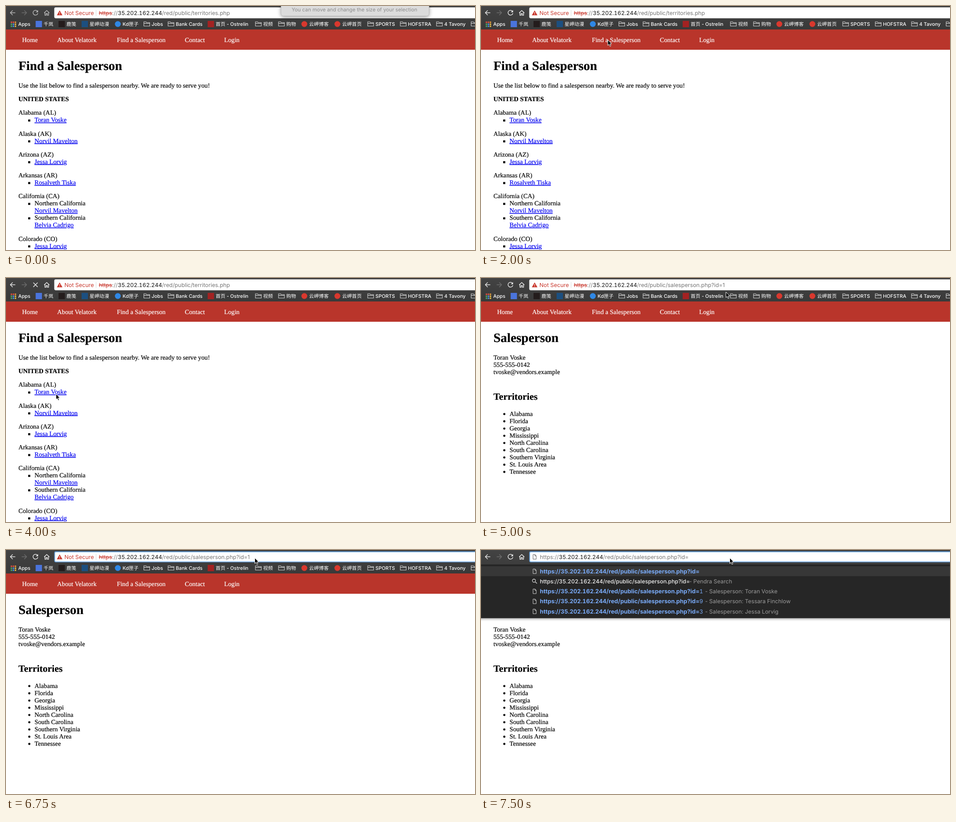
An HTML page that plays this animation: 1036 by 541 pixels, repeating every 8000 ms.

```html
<!DOCTYPE html>
<html lang="en">
<head>
<meta charset="utf-8">
<title>Find a Salesperson</title>
<style>
html, body { margin: 0; width: 100%; height: 100%; overflow: hidden; background: #fff; }
svg { display: block; width: 1036px; height: 541px; }
text { white-space: pre; text-rendering: geometricPrecision; }
.page { font: 14.22px "Liberation Serif", "Times New Roman", serif; }
.page text { stroke: #000; stroke-width: .2; }
.page .nav { fill: #fff; stroke: #fff; }
.page .link { fill: #0000ee; stroke: #0000ee; text-decoration: underline; }
.ui { font: 12.3px Inter, Roboto, sans-serif; }
.marks { font: 500 10.8px Inter, "Noto Sans CJK SC", "Noto Sans CJK", sans-serif; fill: #fff; }
.b { font-weight: 700; }
.hit { font-weight: 700; font-size: 12.8px; fill: #79aaf7; }
.query { font-weight: 500; fill: #f2f2f2; }
.num { font-feature-settings: "tnum"; }
.line { fill: none; stroke-width: 1.5; }
</style>
</head>
<body>
<script>
const W = 1036, H = 541, LOOP = 8000, STEP = 250;
const LINE = 16, GAP = 14.22, LEFT = 27.5, INDENT = 63;
const IP = '35.202.162.244';

const text = (x, y, s, attrs = '') => `<text x="${x}" y="${y}" ${attrs}>${s}</text>`;
const rect = (x, y, w, h, fill, attrs = '') =>
  `<rect x="${x}" y="${y}" width="${w}" height="${h}" fill="${fill}" ${attrs}/>`;
const circle = (x, y, r, fill) => `<circle cx="${x}" cy="${y}" r="${r}" fill="${fill}"/>`;
const path = (d, attrs = '') => `<path d="${d}" ${attrs}/>`;
const group = (id, body, attrs = '') => `<g id="${id}" ${attrs}>${body}</g>`;

// Web pages
const heading = s => text(LEFT, 141.7, s, 'class="b" font-size="28.44"');

function listPage() {
  let y = 241.4;
  let out = heading('Find a Salesperson') +
    text(LEFT, 181, 'Use the list below to find a salesperson nearby. We are ready to serve you!') +
    text(LEFT, 211.2, 'UNITED STATES', 'class="b"');
  const bullet = () => rect(49, y - 5.8, 4.6, 4.6, '#000');
  const link = s => text(INDENT, y, s, 'class="link"');
  const states = [
    ['Alabama (AL)', 'Toran Voske'],
    ['Alaska (AK)', 'Norvil Mavelton'],
    ['Arizona (AZ)', 'Jessa Lorvig'],
    ['Arkansas (AR)', 'Rosalveth Tiska'],
    ['California (CA)', 'Northern California:Norvil Mavelton', 'Southern California:Belvia Cadrigo'],
    ['Colorado (CO)', 'Jessa Lorvig']
  ];
  for (const [state, ...people] of states) {
    out += text(LEFT, y, state);
    for (const person of people) {
      const parts = person.split(':');
      y += LINE;
      out += bullet();
      if (parts[1]) {
        out += text(INDENT, y, parts[0]);
        y += LINE;
      }
      out += link(parts.pop());
    }
    y += LINE + GAP;
  }
  return out;
}

function personPage() {
  const areas = ['Alabama', 'Florida', 'Georgia', 'Mississippi', 'North Carolina',
    'South Carolina', 'Southern Virginia', 'St. Louis Area', 'Tennessee'];
  return heading('Salesperson') +
    ['Toran Voske', '555-555-0142', 'tvoske@vendors.example']
      .map((s, i) => text(LEFT, 181 + i * LINE, s)).join('') +
    text(LEFT, 270, 'Territories', 'class="b" font-size="21.33"') +
    areas.map((s, i) => {
      const y = 305.5 + i * 16.04;
      return circle(51.5, y - 3.8, 2.4, '#000') + text(INDENT, y, s);
    }).join('');
}

const nav = rect(0, 52, W, 45, '#b9352b') +
  [[35.5, 'Home'], [113, 'About Velatork'], [245, 'Find a Salesperson'], [395, 'Contact'], [482, 'Login']]
    .map(([x, s]) => text(x, 80, s, 'class="nav"')).join('');

// Browser chrome
const folder = x => path(`M${x - 6.5} 44.5v-9.5h4.6l1.4 1.7h7v7.8zM${x - 6.5} 38.6h13`,
  'fill="none" stroke="#d2d2d2" stroke-width="1.1"');
const square = (x, fill) => rect(x - 7, 33, 14, 14, fill);
const dot = (x, fill) => circle(x, 40, 6.5, fill);

function apps() {
  const hues = ['#e8503f', '#e8503f', '#f0a03c', '#4fae62', '#4a8fe8', '#f0c24a', '#4fae62', '#4a8fe8', '#f0c24a'];
  return hues.map((c, i) => rect(10.5 + i % 3 * 4.4, 34.5 + Math.floor(i / 3) * 4.4, 3.1, 3.1, c)).join('');
}

function bookmarks() {
  const folders = [[311, 'Jobs'], [364.5, 'Bank Cards'], [557.5, '视频'], [608.5, '购物'],
    [805.5, 'SPORTS'], [877.5, 'HOFSTRA'], [957.5, '4 Tavony'], [1034, '']];
  const sites = [
    [72.5, square, '#4a74dc', '千岚'], [123, square, '#241c1c', '鹿笺'],
    [174, square, '#1c4f80', '星岬动漫'], [247, dot, '#2f88e6', 'Kd匣子'],
    [452.5, square, '#a32222', '首页 - Ostrelin'],
    [659, dot, '#d9382e', '云岬博客'], [732, dot, '#d9382e', '云岬首页']
  ];
  return apps() + text(27, 44, 'Apps') +
    folders.map(([x, s]) => folder(x) + text(x + 10.5, 44, s)).join('') +
    sites.map(([x, icon, c, s]) => icon(x, c) + text(x + 10.5, 44, s)).join('');
}

const sheet = (y, color) => path(`M115 ${y - 5.2}h4.4l2.6 2.6v7.6h-7zM119.2 ${y - 5}v2.8h2.7`,
  `fill="none" stroke="${color}"`);

const buttons =
  path('M20.5 15H9.8M14.8 9.8L9.6 15l5.2 5.2', 'class="line"') +
  group('reload', path('M69.2 11.3A5.4 5.4 0 1 0 70.4 16', 'class="line"') +
    path('M70.9 9v5h-5z', 'stroke="none" fill="currentColor"')) +
  group('stop', path('M60.3 10.3l9.6 9.6M69.9 10.3l-9.6 9.6', 'class="line"')) +
  path('M84.3 15.4L90 10l5.7 5.4M86 14.2v6.2h2.7v-3.6h2.6v3.6H94v-6.2', 'class="line" stroke-width="1.3"');

const GREY = 'fill="#757575"';
const address = (x, tail) =>
  text(x, 20, IP, 'class="num" fill="#111"') + text(x + 97.6, 20, tail, GREY);

const insecure =
  path('M118.5 10.3L124.2 20.3H112.8z', 'fill="#c8372c" stroke="#c8372c" stroke-width=".6" stroke-linejoin="round"') +
  path('M118.5 13.4v3.6M118.5 18v1.2', 'stroke="#fff" stroke-width="1.1"') +
  text(129, 20, 'Not Secure', 'fill="#c8372c"') +
  rect(198.5, 9, 1, 13, '#d8d8d8') +
  rect(205, 7, 334, 16, '#b3d5fd', 'id="mark"') +
  text(205, 20, `<tspan fill="#c8372c" text-decoration="line-through">https</tspan><tspan ${GREY}>://</tspan>`) +
  group('listUrl', address(247, '/red/public/territories.php')) +
  group('personUrl', address(247, '/red/public/salesperson.php?id=1'));

const editing = sheet(15.3, '#5a5a5a') + text(130, 20, 'https://', GREY) +
  address(172, '/red/public/salesperson.php?id=');

function dropdown() {
  const base = '/red/public/salesperson.php?id=';
  const row = i => 51.6 + i * 22.25;
  const bold = (i, id) => text(130, row(i),
    `https://${IP}${base}<tspan font-weight="400" font-size="12.3">${id}</tspan>`, 'class="hit num"');
  const note = (x, i, s) => text(x, row(i), '- ' + s, 'fill="#9b9b9b"');
  const hits = [['1', 'Toran Voske'], ['9', 'Tessara Finchlow'], ['3', 'Jessa Lorvig']];
  const query = (x, s) => text(x, row(1), s, 'class="query num"');
  return rect(0, 151, W, 7, 'url(#shade)') +
    rect(0, 32, W, 119, '#262626') + rect(0, 36, W, 22, '#373737') +
    [0, 2, 3, 4].map(i => sheet(row(i) - 4.3, '#d5d5d5')).join('') + bold(0, '') +
    path('M120 70.7l3.6 3.6', 'stroke="#d5d5d5" stroke-width="1.5"') +
    '<circle cx="117" cy="68" r="3.5" fill="none" stroke="#d5d5d5" stroke-width="1.3"/>' +
    query(130, 'https://') + query(172, IP) + query(269.6, base) +
    note(460, 1, 'Pendra Search') +
    hits.map(([id, name], k) => bold(k + 2, id) + note(495, k + 2, 'Salesperson: ' + name)).join('');
}

const hint = rect(607.5, -12, 327, 34, '#dcdcdc', 'rx="5" stroke="#b4b4b4" stroke-width=".6"') +
  text(631, 11.8, 'You can move and change the size of your selection', 'fill="#8c8c8c" font-size="11.25"');

document.body.innerHTML = `<svg viewBox="0 0 ${W} ${H}">
<defs>
<linearGradient id="bar" x2="0" y2="1"><stop stop-color="#434343"/><stop offset="1" stop-color="#393939"/></linearGradient>
<linearGradient id="shade" x2="0" y2="1"><stop stop-color="#000" stop-opacity=".36"/><stop offset=".5" stop-color="#000" stop-opacity=".1"/><stop offset="1" stop-color="#000" stop-opacity="0"/></linearGradient>
</defs>
${rect(0, 0, W, H, '#fff')}
<g class="page">${group('list', listPage())}${group('person', personPage())}${nav}</g>
${rect(0, 0, W, 52, 'url(#bar)')}
${group('marks', bookmarks(), 'class="marks"')}
<g class="ui">
${group('drop', dropdown())}
${path('M34.6 15h10.7M40.3 9.8l5.2 5.2-5.2 5.2', 'class="line" stroke="#6c6c6c"')}
${group('buttons', buttons)}
${rect(107.5, 4, 950, 22.3, '#fff', 'id="box" rx="2.5" stroke-width="1.8"')}
${group('insecure', insecure)}
${group('editing', editing)}
${rect(0, 8, 1, 15, '#000', 'id="caret"')}
${group('hint', hint, 'style="filter:drop-shadow(0 2px 4px rgba(0,0,0,.4))"')}
</g>
${group('cursor', path('M0 0V12.4L2.8 9.8L4.8 14.4L6.9 13.5L4.9 9H8.7Z', 'fill="#000" stroke="#fff" stroke-width="1" stroke-linejoin="round"'))}
</svg>`;

const el = id => document.getElementById(id);
const show = (id, on) => el(id).setAttribute('display', on ? 'inline' : 'none');

// Pointer stops: time, x, y
const stops = [[500, 520, 62], [750, 425, 87], [1000, 345, 90], [1250, 301, 74], [1500, 288, 74], [1750, 280, 75],
  [2750, 280, 75], [3000, 262, 92], [3500, 140, 226], [3750, 110.5, 257], [4500, 110.5, 257],
  [4750, 330, 135], [5000, 541, 31], [5250, 548, 20], [5500, 549.5, 17.5], [LOOP, 549.5, 17.5]];

function pointer(t) {
  const i = Math.max(1, stops.findIndex(s => s[0] >= t));
  const [t0, x0, y0] = stops[i - 1], [t1, x1, y1] = stops[i];
  const k = Math.max(0, (t - t0) / (t1 - t0));
  return [x0 + (x1 - x0) * k, y0 + (y1 - y0) * k];
}

function render(ms) {
  const t = Math.floor(ms % LOOP / STEP) * STEP;
  const within = (a, b) => t >= a && t < b;
  const onList = t < 4250, typing = t >= 7000;
  const loading = within(2250, 2500) || within(4000, 4250);

  show('list', onList);
  show('listUrl', onList);
  show('person', !onList);
  show('personUrl', !onList);
  show('insecure', !typing);
  show('editing', typing);
  show('drop', typing);
  show('marks', !typing);
  show('reload', !loading);
  show('stop', loading);
  show('mark', within(5750, 6250));
  show('caret', within(6250, 6750) || within(7000, 7500));
  el('caret').setAttribute('x', typing ? 456 : 538.5);
  el('box').setAttribute('stroke', t >= 5500 ? '#6ba5e0' : '#fff');

  const tone = t < 1750 ? '#b4b4b4' : '#e4e4e4';
  el('buttons').setAttribute('stroke', tone);
  el('buttons').setAttribute('color', tone);

  el('hint').setAttribute('opacity', Math.max(0, 1 - t / 750));
  show('hint', t < 750);
  show('cursor', t >= 500);
  el('cursor').setAttribute('transform', `translate(${pointer(t)})`);
}

const start = performance.now();
function tick() {
  render(performance.now() - start);
  requestAnimationFrame(tick);
}
tick();
</script>
</body>
</html>
```
